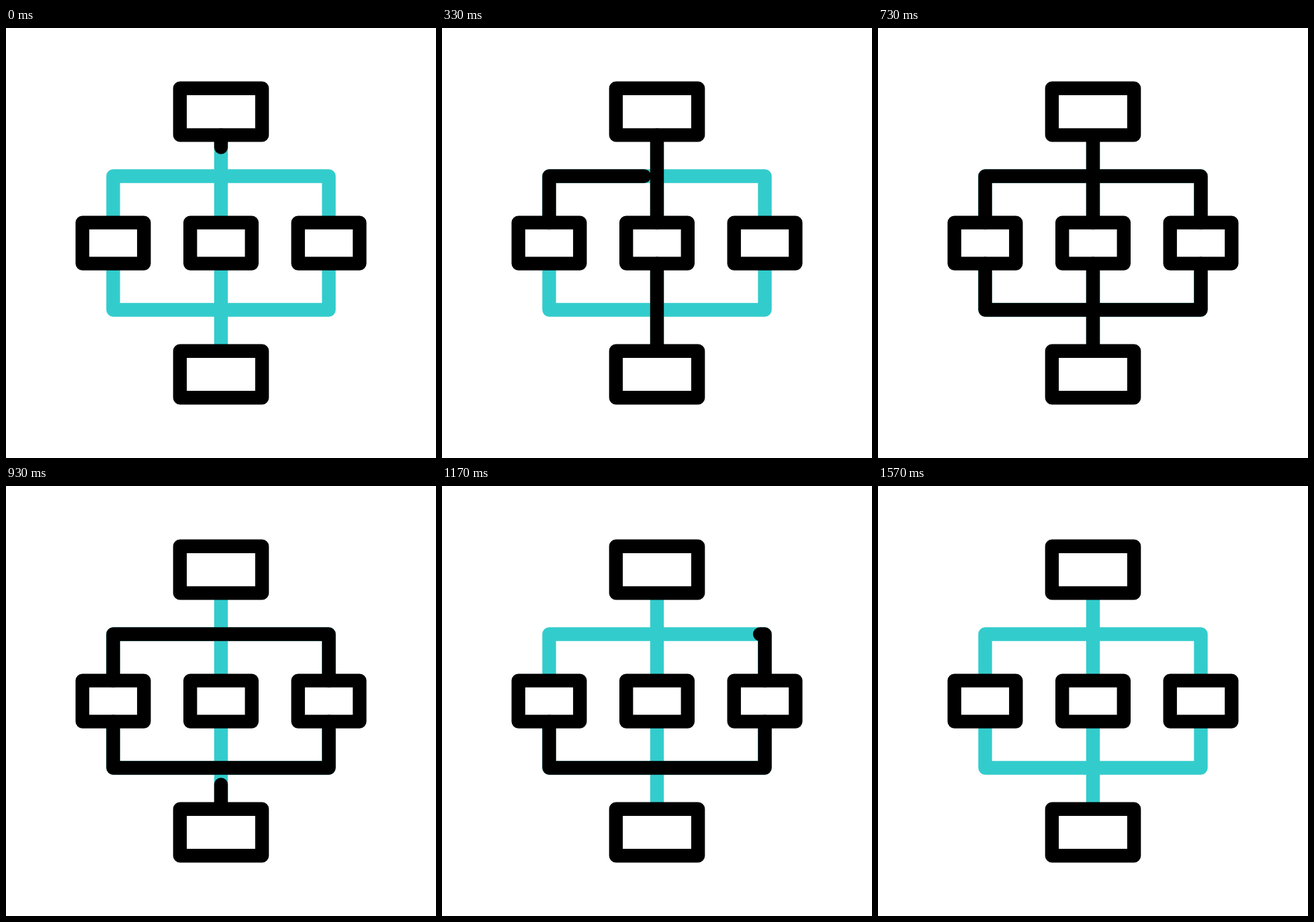
These frames come from a looping animation (640 by 640 pixels, 1.67 s). An HTML page with a canvas:

```html
<!DOCTYPE html>
<html lang="en">
<head>
<meta charset="utf-8">
<title>Flow chart</title>
<style>
  html, body { margin: 0; width: 100%; height: 100%; overflow: hidden; background: #fff; }
  canvas { display: block; }
</style>
</head>
<body>
<canvas id="stage" width="640" height="640"></canvas>
<script>
const ctx = document.getElementById('stage').getContext('2d');
const LOOP = 1670;
const STEP = 1000 / 30;
const TEAL = '#33cccc';
const BLACK = '#000';

const LEFT = 159.5, MID = 320, RIGHT = 480.5;
const ROW_TOP = 289.6, ROW_BOTTOM = 350.6;

// Centre lines of the box outlines: x, y, width, height
const boxes = [
  [258.9, 89.8, 122.2, 69.6],
  [258.9, 480.7, 122.2, 69.6],
  ...[LEFT, MID, RIGHT].map(x => [x - 45.8, ROW_TOP, 91.6, ROW_BOTTOM - ROW_TOP])
];

// Connectors in drawing order; draw and erase are [start, end] in steps
const links = [
  { points: [[MID, 159.4], [MID, ROW_TOP]], draw: [-0.5, 3.1], erase: [21.8, 25.4] },
  { points: [[MID, ROW_BOTTOM], [MID, 480.7]], draw: [3.1, 6.7], erase: [25.4, 29] },
  { points: bracket(LEFT, RIGHT, ROW_TOP, 220.5), draw: [6.7, 13.9], erase: [29, 36.2] },
  { points: bracket(RIGHT, LEFT, ROW_BOTTOM, 419.5), draw: [13.9, 21.7], erase: [36.2, 44] }
];

function bracket(from, to, edge, level) {
  return [[from, edge], [from, level], [to, level], [to, edge]];
}

function pathLength(points) {
  return points.slice(1).reduce((sum, [x, y], i) =>
    sum + Math.hypot(x - points[i][0], y - points[i][1]), 0);
}

function progress(step, [start, end]) {
  return Math.min(1, Math.max(0, (step - start) / (end - start)));
}

function strokeLink(points, color, from = 0, to = 1) {
  if (to <= from) return;
  const length = pathLength(points);
  const whole = from === 0 && to === 1;
  ctx.setLineDash(whole ? [] : [(to - from) * length, 2 * length]);
  ctx.lineDashOffset = -from * length;
  ctx.strokeStyle = color;
  ctx.beginPath();
  points.forEach(([x, y]) => ctx.lineTo(x, y));
  ctx.stroke();
}

function render(time) {
  const step = Math.floor((time % LOOP + 4) / STEP);
  ctx.fillStyle = '#fff';
  ctx.fillRect(0, 0, 640, 640);
  ctx.lineWidth = 20.4;
  ctx.lineJoin = 'round';

  ctx.lineCap = 'butt';
  links.forEach(({ points }) => strokeLink(points, TEAL));

  ctx.lineCap = 'round';
  links.forEach(({ points, draw, erase }) =>
    strokeLink(points, BLACK, progress(step, erase), progress(step, draw)));

  ctx.setLineDash([]);
  ctx.strokeStyle = BLACK;
  boxes.forEach(box => ctx.strokeRect(...box));
}

let origin;
function tick(now) {
  origin ??= now;
  render(now - origin);
  requestAnimationFrame(tick);
}
render(0);
requestAnimationFrame(tick);
</script>
</body>
</html>
```
